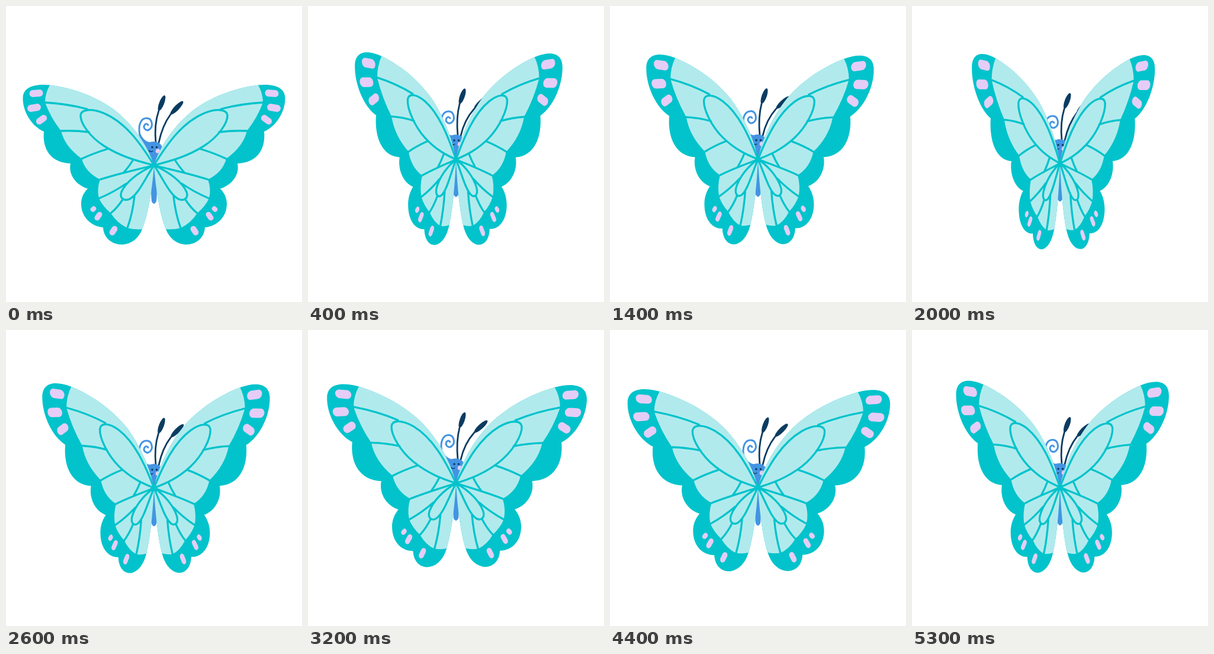
Write an HTML page with a canvas that moves like this. It is 500 px wide and 500 px high and loops after 5.4 s.

```html
<!DOCTYPE html>
<html>
<head>
<meta charset="utf-8">
<style>
html, body { margin: 0; width: 100%; height: 100%; overflow: hidden; background: #fff; }
canvas { display: block; width: 500px; height: 500px; }
</style>
</head>
<body>
<canvas id="stage" width="500" height="500"></canvas>
<script>
const ctx = document.getElementById('stage').getContext('2d');
const LOOP = 5400, STEP = 100, BOB = 913;
const TEAL = '#02c3cb', LIGHT = '#b1eaed', PINK = '#e5cdf7', BLUE = '#4494e3', NAVY = '#0b3c61';
const RAD = Math.PI / 180;
const ROOT = { x: 250, y: 269.5 };
const DEPTH = 658; // viewing distance for the folding wings

// Left wing lying flat; the right one is mirrored.
const upperEdge = `M250 269 C240 237 215 200 181 174 C147 150 108 138 74 133.5
  C50 131 29 136 28.5 155 C28 178 43 203 64 212 C61 242 76 265 109 266
  C104 288 124 310 152 311 L175 300 Z`;
const lowerEdge = `M250 269 L157 294 C143 303 127 314 127 334 C127 356 143 372 164 374
  C165 392 179 403 196 403 C213 402 224 392 230 377 C240 352 247 310 250 269 Z`;
const upperFill = `M250 269 C240 237 215 200 181 174 C147 150 108 138 74 133.5
  Q66 148 66 163 Q75 188 93 211 Q99 237 128 258 Q134 281 159 293 L190 283 Z`;
const lowerFill = `M250 269 L159 293 Q153 309 157 325 Q163 338 177 350
  Q188 367 205 375 Q217 378 230 377 C240 352 247 310 250 269 Z`;
const veins = `M66 163 Q103 165 137 174
  M250 269 C226 230 201 196 165 181 C145 173 128 174 126 184 C125 198 142 221 165 236 C193 254 222 262 250 269
  M93 211 Q117 210 140 213 M128 258 Q147 249 173 241 M214 261 Q208 271 198 282
  M159 293 C187 284 219 277 250 269
  M250 269 C223 281 202 298 195 314 C191 325 200 330 209 326 C224 318 235 291 250 269
  M157 325 Q181 315 203 300 M177 350 Q188 341 197 327 M205 375 Q214 350 217 321`;

// x, y, length, thickness, angle
const spots = [
  [51, 147.5, 23, 12, -4], [47.5, 172, 23, 12, -10], [60, 192, 20, 11, -36],
  [181.5, 379.5, 17, 10, -58], [156, 355, 16, 9, -55], [147.5, 343, 10, 8, -40]
];

// Time and flap phase in degrees
const flapKeys = [[0, 0], [400, 246], [1400, 826], [2000, 1203], [3200, 1889],
  [4400, 2607], [5300, 3128], [5400, 3187]];

function flapAngle(t) {
  const i = Math.max(1, flapKeys.findIndex(k => k[0] >= t));
  const [t0, p0] = flapKeys[i - 1], [t1, p1] = flapKeys[i];
  const phase = p0 + (p1 - p0) * (t - t0) / (t1 - t0);
  return (40 - 40 * Math.cos(phase * RAD)) * RAD;
}

function fill(path, color) {
  ctx.fillStyle = color;
  ctx.fill(path);
}

function stroke(path, color, width) {
  ctx.strokeStyle = color;
  ctx.lineWidth = width;
  ctx.stroke(path);
}

function disc(x, y, r, color) {
  ctx.fillStyle = color;
  ctx.beginPath();
  ctx.arc(x, y, r, 0, 7);
  ctx.fill();
}

function pill(length, width, angle) {
  const dx = Math.cos(angle * RAD) * (length - width) / 2;
  const dy = Math.sin(angle * RAD) * (length - width) / 2;
  stroke(new Path2D(`M${-dx} ${-dy} L${dx} ${dy}`), PINK, width);
}

function wing(side, angle, lift) {
  const cos = Math.cos(angle), sin = Math.sin(angle);
  const nearness = x => DEPTH / (DEPTH + x * sin);
  const project = (x, y) => {
    const k = nearness(x - ROOT.x);
    return [(x - ROOT.x) * cos * k, (y - ROOT.y) * k];
  };
  const folded = d => new Path2D(
    d.replace(/([\d.]+) ([\d.]+)/g, (_, x, y) => project(+x, +y).join(' ')));

  ctx.save();
  ctx.translate(ROOT.x, ROOT.y + lift * 0.85);
  ctx.scale(side, 1);
  fill(folded(upperEdge), TEAL);
  fill(folded(lowerEdge), TEAL);
  fill(folded(lowerFill), LIGHT);
  fill(folded(upperFill), LIGHT);
  stroke(folded(veins), TEAL, 3.3);
  for (const [x, y, length, width, tilt] of spots) {
    const k = nearness(x - ROOT.x);
    const shear = -(y - ROOT.y) * k * k * sin / DEPTH;
    ctx.save();
    ctx.transform(cos * k * k, shear, 0, k, ...project(x, y));
    pill(length, width, tilt);
    ctx.restore();
  }
  ctx.restore();
}

function antenna(x, y, bendX, bendY, neckX, neckY, tipX, tipY) {
  stroke(new Path2D(`M${x} ${y} Q${bendX} ${bendY} ${neckX} ${neckY}`), NAVY, 2.8);
  const dx = tipX - neckX, dy = tipY - neckY, len = Math.hypot(dx, dy);
  ctx.save();
  ctx.translate((neckX + tipX) / 2, (neckY + tipY) / 2);
  ctx.rotate(Math.atan2(dy, dx));
  ctx.fillStyle = NAVY;
  ctx.beginPath();
  ctx.ellipse(0, 0, len / 2, 4.2, 0, 0, 7);
  ctx.fill();
  ctx.restore();
}

const head = new Path2D(`M226 213 C230 224 236 229 243 230 C251 227 262 230 264 239
  C265 247 258 256 250 268 C246 259 239 253 236 244 C234 236 225 228 224 212 Z`);
const tail = new Path2D('M250 264 C246 282 244 313 246 330 Q250 338 254 330 C256 313 254 282 250 264 Z');
const curl = new Path2D(`M226 218 C223 202 227 190 237 189.5 C247 189 249 203 243 208
  C237 213 231 206 234 201 Q237 197 240 201`);
const smile = new Path2D('M241.5 244 Q244 247.5 248 245');

function body(lift) {
  const sway = -lift / 12;
  ctx.save();
  ctx.translate(0, lift);
  antenna(253, 231, 250, 200, 258 - 2 * sway, 177, 268 - 3 * sway, 151);
  antenna(258, 231, 264, 202 + 2 * sway, 278 + 3 * sway, 183 + 2 * sway, 299 + 4 * sway, 161 + 4 * sway);
  fill(tail, BLUE);
  stroke(curl, BLUE, 3);
  fill(head, BLUE);
  disc(247, 238.5, 1.8, NAVY);
  disc(254.5, 238.5, 1.8, NAVY);
  stroke(smile, NAVY, 1.3);
  disc(256.5, 245, 3.8, PINK);
  ctx.restore();
}

function draw(now) {
  const t = Math.floor(now % LOOP / STEP) * STEP;
  const lift = -6 + 6 * Math.cos(2 * Math.PI * t / BOB);
  const angle = flapAngle(t);
  ctx.fillStyle = '#fff';
  ctx.fillRect(0, 0, 500, 500);
  ctx.lineCap = ctx.lineJoin = 'round';
  body(lift);
  wing(1, angle, lift);
  wing(-1, angle * 0.955, lift);
}

const start = performance.now();
function tick() {
  draw(performance.now() - start);
  requestAnimationFrame(tick);
}
tick();
</script>
</body>
</html>
```
